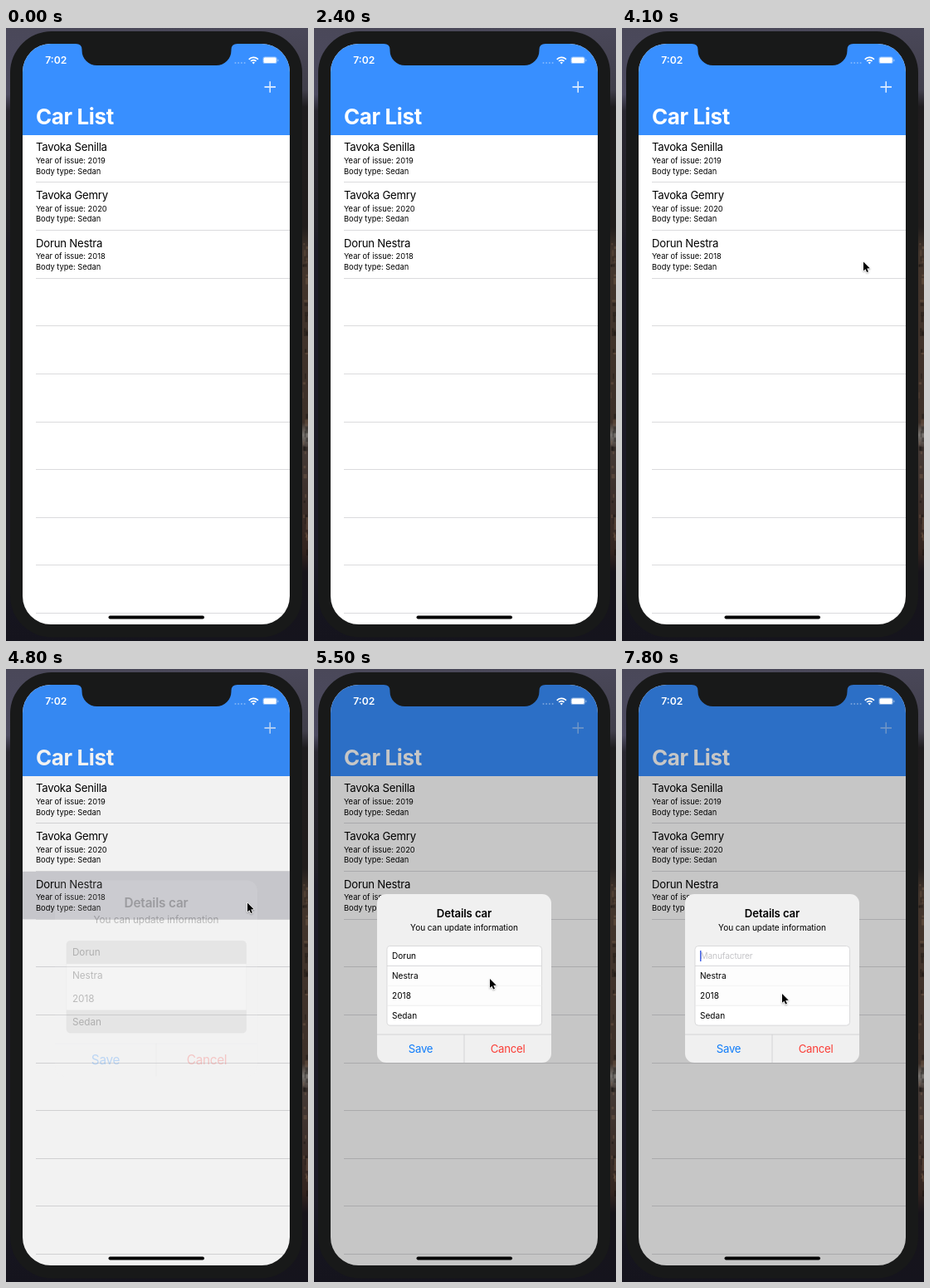
These frames come from a looping animation (364x738 px, 8 s). An HTML page with a canvas:

```html
<!DOCTYPE html>
<html lang="en">
<head>
<meta charset="utf-8">
<title>Car List</title>
<style>
html, body { margin: 0; width: 100%; height: 100%; overflow: hidden; background: #15141b; }
canvas { display: block; width: 364px; height: 738px; }
</style>
</head>
<body>
<canvas id="stage"></canvas>
<script>
const W = 364, H = 738, LOOP = 8000;
const FONT = 'Inter, Roboto, "Liberation Sans", sans-serif';
const canvas = document.getElementById('stage');
const ctx = canvas.getContext('2d');
const ratio = window.devicePixelRatio || 1;
canvas.width = W * ratio;
canvas.height = H * ratio;

const SCREEN = { x: 20, y: 19, w: 322, h: 699 };
const HEAD_BOTTOM = 129, LIST_TOP = 128.5, ROW = 57.63, PICKED = 2;
const ALERT = { x: 76, y: 271, w: 210, h: 203, cx: 181, cy: 372.5 };
const cars = [
  ['Tavoka', 'Senilla', '2019', 'Sedan'],
  ['Tavoka', 'Gemry', '2020', 'Sedan'],
  ['Dorun', 'Nestra', '2018', 'Sedan']
];

// Pointer stops: time, x, y
const path = [
  [3150, 370, 382], [3400, 286, 299], [3900, 291, 281.5],
  [4850, 291, 281.5], [5500, 212, 373], [6200, 193, 391]
];
const TAP = 4600, OPEN = 4784, ERASE = 6300;

const clamp = (v, lo = 0, hi = 1) => Math.min(hi, Math.max(lo, v));
const smooth = u => u * u * (3 - 2 * u);
const decay = (t, start, span) => Math.exp(-Math.max(0, t - start) / span);

function text(str, x, y, size, { weight = 400, color = '#000', align = 'left', track = 0 } = {}) {
  ctx.font = `${weight} ${size}px ${FONT}`;
  ctx.letterSpacing = `${track * size}px`;
  ctx.textAlign = align;
  ctx.fillStyle = color;
  ctx.fillText(str, x, y);
}

function box(x, y, w, h, r, fill) {
  ctx.beginPath();
  ctx.roundRect(x, y, w, h, r);
  ctx.fillStyle = fill;
  ctx.fill();
}

function rect(x, y, w, h, fill) {
  ctx.fillStyle = fill;
  ctx.fillRect(x, y, w, h);
}

function line(x1, y1, x2, y2, color, width = 1) {
  ctx.beginPath();
  ctx.moveTo(x1, y1);
  ctx.lineTo(x2, y2);
  ctx.strokeStyle = color;
  ctx.lineWidth = width;
  ctx.stroke();
}

function strip(x, w, stops) {
  const g = ctx.createLinearGradient(0, 0, 0, H);
  stops.forEach(([y, color]) => g.addColorStop(y / H, color));
  rect(x, 0, w, H, g);
}

function drawWallpaper() {
  strip(0, W / 2, [[0, '#4a4859'], [80, '#4c4a60'], [100, '#28262f'], [240, '#211f26'],
    [260, '#1d1b26'], [640, '#1d1b27'], [700, '#16151f'], [H, '#15141d']]);
  strip(W / 2, W / 2, [[0, '#4a4859'], [75, '#403e4a'], [95, '#1e1c1e'], [240, '#211d1c'],
    [270, '#43352c'], [475, '#3d3029'], [490, '#77736f'], [505, '#453a36'],
    [630, '#33241f'], [655, '#17141a'], [H, '#15141d']]);
  let seed = 7;
  const rnd = () => (seed = seed * 16807 % 2147483647) / 2147483647;
  for (let i = 0; i < 45; i++) {
    const shade = rnd() < 0.5 ? 'rgba(0,0,0,.28)' : 'rgba(150,115,90,.26)';
    rect(357 + rnd() * 5, 255 + rnd() * 375, 1 + rnd() * 4, 2 + rnd() * 6, shade);
  }
}

function drawBody() {
  box(5, 4, 352, 729.5, 50, '#181919');
}

function drawList(t) {
  rect(SCREEN.x, SCREEN.y, SCREEN.w, SCREEN.h, '#fff');
  if (t >= TAP) {
    ctx.globalAlpha = clamp(1 - (t - 4800) / 200);
    rect(SCREEN.x, LIST_TOP + PICKED * ROW, SCREEN.w, ROW, '#d1d1d6');
    ctx.globalAlpha = 1;
  }
  for (let i = 1; i <= 10; i++) {
    const y = Math.floor(LIST_TOP + i * ROW - 0.2) + 0.5;
    line(36, y, 342, y, '#dbdbdd');
  }
  cars.forEach(([make, model, year, type], i) => {
    const y = LIST_TOP + i * ROW;
    text(`${make} ${model}`, 36, y + 19.8, 13.2, { track: -0.018 });
    text(`Year of issue: ${year}`, 36, y + 34.4, 9.33);
    text(`Body type: ${type}`, 36, y + 47, 9.33);
  });
  rect(SCREEN.x, SCREEN.y, SCREEN.w, HEAD_BOTTOM - SCREEN.y, '#388fff');
  text('Car List', 36, 116.3, 26, { weight: 700, color: '#fff', track: -0.015 });
  // The tint of the button fades while the alert is up
  const tint = `rgba(255,255,255,${(0.5 + 0.5 * decay(t, OPEN, 40)).toFixed(3)})`;
  line(311.5, 71, 325, 71, tint, 1.3);
  line(318.2, 64.2, 318.2, 70.35, tint, 1.3);
  line(318.2, 71.65, 318.2, 77.8, tint, 1.3);
}

function drawStatus() {
  text('7:02', 47.2, 43.3, 12.2, { weight: 600, color: '#fff' });
  for (let i = 0; i < 4; i++) {
    box(275.5 + i * 3.7, 41, 2, 2, 1, 'rgba(255,255,255,.35)');
  }
  ctx.strokeStyle = '#fff';
  ctx.lineWidth = 1.7;
  [4.4, 7.6].forEach(r => {
    ctx.beginPath();
    ctx.arc(298.3, 43, r, -Math.PI * 0.76, -Math.PI * 0.24);
    ctx.stroke();
  });
  ctx.beginPath();
  ctx.moveTo(298.3, 43.4);
  ctx.arc(298.3, 43, 2.2, -Math.PI * 0.78, -Math.PI * 0.22);
  ctx.fillStyle = '#fff';
  ctx.fill();
  box(309.5, 34.5, 17.2, 8.6, 2.6, 'rgba(255,255,255,.4)');
  box(310.6, 35.6, 15, 6.4, 1.6, '#fff');
  box(327.3, 37.4, 1.1, 2.8, 0.5, 'rgba(255,255,255,.5)');
  box(123.5, 707.4, 115.5, 4, 2, '#000');
}

function drawNotch() {
  ctx.beginPath();
  ctx.moveTo(84, 18);
  ctx.lineTo(84, 19);
  ctx.quadraticCurveTo(91.5, 19, 91.5, 26);
  ctx.arcTo(91.5, 45, 111, 45, 18);
  ctx.lineTo(253, 45);
  ctx.arcTo(271.5, 45, 271.5, 26, 18);
  ctx.lineTo(271.5, 26);
  ctx.quadraticCurveTo(271.5, 19, 279, 19);
  ctx.lineTo(279, 18);
  ctx.fillStyle = '#181919';
  ctx.fill();
}

// One second blink: on, fade out, off, fade in
function blink(ms) {
  const p = ms % 1000;
  if (p < 400) return 1;
  return p < 800 ? clamp(1 - (p - 400) / 200) : (p - 800) / 200;
}

function caretAlpha(t) {
  if (t < 4850) return 0;
  if (t < 6250) return blink(t - 4850);
  return t < 6700 ? 1 : blink(t - 6480);
}

function drawFields(t, fade, ink) {
  const x = 88, y = 333.5, w = 186.5, h = 23.9;
  const tone = Math.round(255 - 115 * decay(t, 4800, 40));
  const edge = `rgb(${tone},${tone},${tone})`;
  ctx.globalAlpha = fade;
  box(x, y, w, h, [4, 4, 0, 0], edge);
  rect(x, y + h, w, h * 2, '#fdfdfd');
  box(x, y + h * 3, w, h, [0, 0, 4, 4], edge);
  ctx.beginPath();
  ctx.roundRect(x, y, w, h * 4, 4);
  ctx.strokeStyle = '#d2d2d4';
  ctx.lineWidth = 0.8;
  ctx.stroke();
  line(x, y + h, x + w, y + h, '#d0d0d2', 0.8);
  line(x, y + h * 2, x + w, y + h * 2, '#f1f1f1', 0.8);
  line(x, y + h * 3, x + w, y + h * 3, '#ececec', 0.8);

  const values = cars[PICKED].slice();
  const erased = clamp(Math.floor((t - ERASE) / 100) + 1, 0, values[0].length);
  values[0] = values[0].slice(0, values[0].length - erased);
  ctx.globalAlpha = ink;
  values.forEach((v, i) => text(v, 94, y + i * h + 15.6, 10.1));
  if (!values[0]) text('Manufacturer', 94.5, y + 15.6, 10.1, { color: '#c4c4c7', track: -0.012 });

  ctx.font = `400 10.1px ${FONT}`;
  const end = 94 + ctx.measureText(values[0]).width;
  ctx.globalAlpha = fade * caretAlpha(t);
  rect(end, y + 5.5, 1.5, 13, '#4463e6');
}

function drawAlert(t) {
  const fade = clamp((t - OPEN) / 130);
  if (!fade) return;
  const ink = Math.pow(fade, 0.7);
  const scale = 1 + 0.2 * decay(t, 4788, 62);
  const { x, y, w, h, cx, cy } = ALERT;
  ctx.save();
  ctx.translate(cx, cy);
  ctx.scale(scale, scale);
  ctx.translate(-cx, -cy);
  ctx.globalAlpha = fade;
  box(x, y, w, h, 11, '#f0f0f0');
  line(x, 440, x + w, 440, '#cdcdcf', 0.8);
  line(cx, 440, cx, y + h, '#cdcdcf', 0.8);
  drawFields(t, fade, ink);
  ctx.globalAlpha = ink;
  const mid = { align: 'center' };
  text('Details car', cx, 299.2, 13.2, { ...mid, weight: 600, track: -0.01 });
  text('You can update information', cx, 315, 10.1, { ...mid, track: -0.006 });
  text('Save', 128.5, 461.8, 13.2, { ...mid, color: '#0f7cfa', track: -0.02 });
  text('Cancel', 233.5, 461.8, 13.2, { ...mid, color: '#fb3c35', track: -0.02 });
  ctx.restore();
}

function drawPointer(t) {
  if (t < path[0][0]) return;
  let [, x, y] = path[path.length - 1];
  for (let i = 1; i < path.length; i++) {
    const [t0, x0, y0] = path[i - 1], [t1, x1, y1] = path[i];
    if (t < t1) {
      const u = smooth((t - t0) / (t1 - t0));
      x = x0 + (x1 - x0) * u;
      y = y0 + (y1 - y0) * u;
      break;
    }
  }
  ctx.save();
  ctx.translate(x, y);
  ctx.scale(0.9, 0.9);
  ctx.beginPath();
  [[0, 0], [0, 12], [2.7, 9.6], [4.6, 14], [6.6, 13.1], [4.7, 8.9], [8.6, 8.7]]
    .forEach(p => ctx.lineTo(...p));
  ctx.closePath();
  ctx.shadowColor = 'rgba(0,0,0,.3)';
  ctx.shadowBlur = 2 * ratio;
  ctx.shadowOffsetY = ratio;
  ctx.lineJoin = 'round';
  ctx.lineWidth = 1.6;
  ctx.strokeStyle = '#fff';
  ctx.stroke();
  ctx.shadowColor = 'transparent';
  ctx.fillStyle = '#000';
  ctx.fill();
  ctx.restore();
}

function draw(t) {
  ctx.setTransform(ratio, 0, 0, ratio, 0, 0);
  drawWallpaper();
  drawBody();
  ctx.save();
  ctx.beginPath();
  ctx.roundRect(SCREEN.x, SCREEN.y, SCREEN.w, SCREEN.h, 34);
  ctx.clip();
  drawList(t);
  const dim = 0.225 * (1 - decay(t, OPEN, 65));
  rect(SCREEN.x, SCREEN.y, SCREEN.w, SCREEN.h, `rgba(0,0,0,${dim.toFixed(4)})`);
  drawAlert(t);
  drawStatus();
  ctx.restore();
  drawNotch();
  drawPointer(t);
}

const start = performance.now();
function tick(now) {
  draw(Math.max(0, now - start) % LOOP);
  requestAnimationFrame(tick);
}
draw(0);
requestAnimationFrame(tick);
</script>
</body>
</html>
```
